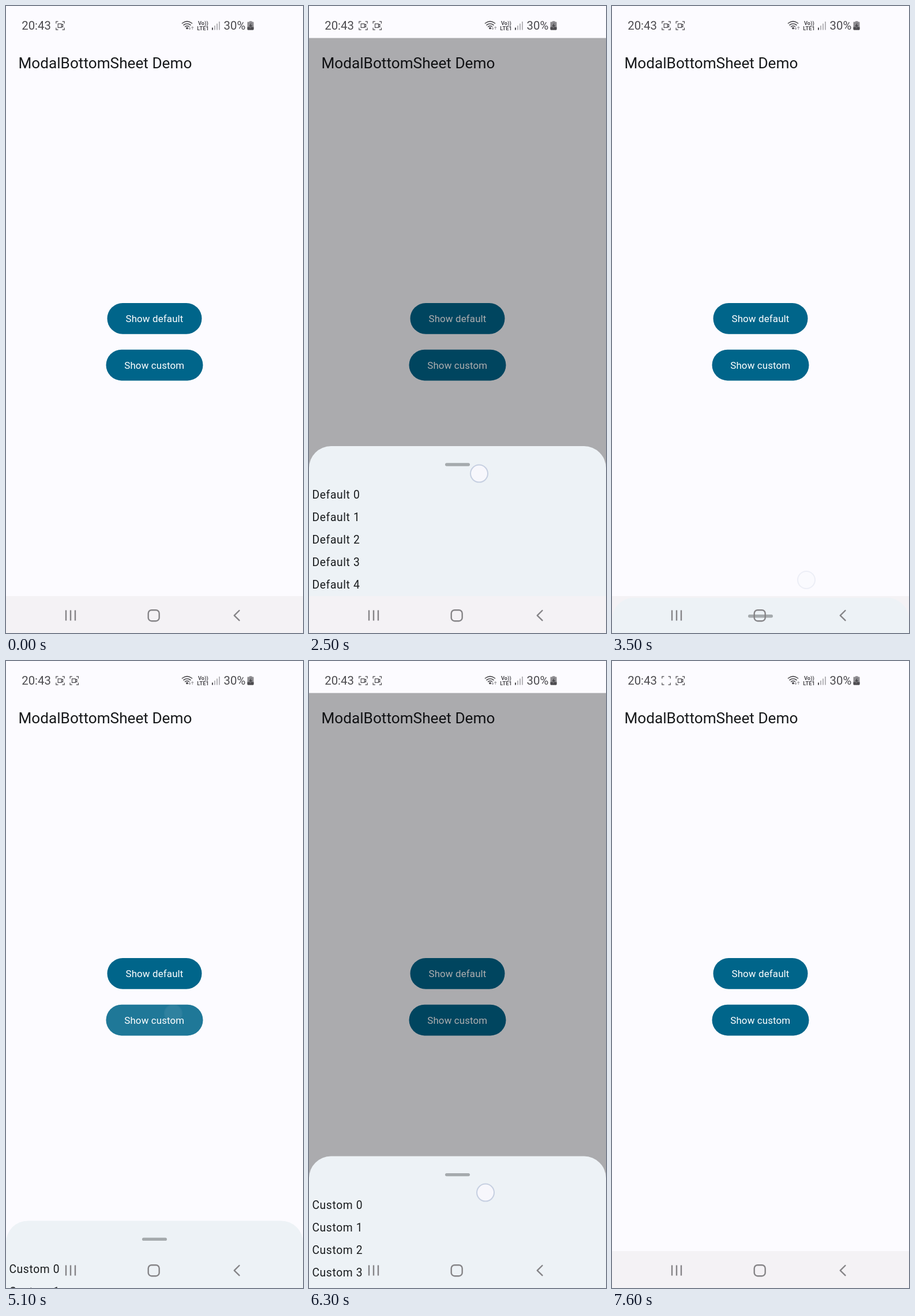
Recreate the animation shown at these times as an HTML page. Size 515 by 1087 pixels, loop 8000 ms.

```html
<!DOCTYPE html>
<html lang="en">
<head>
<meta charset="utf-8">
<title>Bottom sheet demo</title>
<style>
  html, body { margin: 0; width: 100%; height: 100%; overflow: hidden; background: #fcfbff; }
  svg { display: block; width: 100%; height: 100%; font-family: Roboto, "Open Sans", sans-serif; }
  .label { font-size: 16.9px; letter-spacing: .14px; fill: #fff; text-anchor: middle; }
  .item { font-size: 19.3px; letter-spacing: .64px; fill: #191c1e; }
  .line { fill: none; stroke-linecap: round; stroke-linejoin: round; }
</style>
</head>
<body>
<svg viewBox="0 0 515 1087">
  <defs>
    <path id="corners" d="M-7.2 -4v-3.2h3.2M4 -7.2h3.2v3.2M7.2 4v3.2h-3.2M-4 7.2h-3.2v-3.2"/>
    <path id="camera" d="M-3.8 -3.2h6v6.6h-6zM2.2 -.8l2.4 -1.6v5l-2.4 -1.6"/>
  </defs>
  <rect width="515" height="1087" fill="#fcfbff"/>
  <text x="21.4" y="107.5" font-size="26.2" fill="#17191b">ModalBottomSheet Demo</text>

  <rect x="175.5" y="515" width="164" height="53.7" rx="26.85" fill="#00658a"/>
  <rect id="rippleDefault" x="175.5" y="515" width="164" height="53.7" rx="26.85" fill="#fff"/>
  <text class="label" x="257.5" y="547.8">Show default</text>
  <rect x="173.5" y="595.7" width="168" height="53.7" rx="26.85" fill="#00658a"/>
  <rect id="rippleCustom" x="173.5" y="595.7" width="168" height="53.7" rx="26.85" fill="#fff"/>
  <text class="label" x="257.3" y="628.5">Show custom</text>

  <rect id="scrim" y="55.5" width="515" height="967.5" fill="#030004"/>
  <rect y="1023" width="515" height="64" fill="#f4f2f5"/>

  <g id="sheet">
    <path d="M0 260V38A38 38 0 0 1 38 0H477A38 38 0 0 1 515 38V260Z" fill="#edf2f6"/>
    <rect x="236" y="29.3" width="43" height="5.4" rx="2.7" fill="#a5aaad"/>
    <g id="items"></g>
  </g>
  <rect id="navCover" width="515" height="64" fill="#f4f2f5"/>

  <g class="line" stroke="#858487" stroke-width="2.4">
    <path d="M104 1047.5v18M112 1047.5v18M120 1047.5v18" stroke-linecap="butt"/>
    <rect x="246.7" y="1047.2" width="19" height="19" rx="5.8"/>
    <path d="M404.5 1048l-8.7 8.6 8.7 8.6"/>
  </g>

  <g fill="#4c4b4f">
    <text x="27.2" y="41" font-size="20.4">20:43</text>
    <text x="377.6" y="41" font-size="20.3">30%</text>
    <g font-size="9.3" font-weight="700">
      <text x="333" y="33">Vo))</text>
      <text x="331.3" y="42">LTE1</text>
    </g>
    <path d="M422 27.5v-1.3h4.5v1.3h2q1 0 1 1v11.5q0 1.5 -1.5 1.5h-8q-1.5 0 -1.5 -1.5v-11.5q0 -1 1 -1z" fill="#8d8c90"/>
    <path d="M418.5 36.5h11v3.5q0 1.5 -1.5 1.5h-8q-1.5 0 -1.5 -1.5zM425.5 29l-4.3 6.2h2.5l-.8 4.3 4.4 -6.2h-2.6z"/>
    <path d="M357 37.5h2v4h-2z"/>
    <path d="M361 34h2v7.5h-2zM365 30.5h2v11h-2zM369 27h2v14.5h-2z" fill="#b5b4b8"/>
    <circle cx="314" cy="38.4" r="1.9"/>
  </g>
  <g class="line" stroke="#4c4b4f" stroke-width="1.6">
    <path d="M305.5 30q8.5 -6.8 17 0M308 33q6 -4.6 12 0M310.6 35.8q3.4 -2.4 6.4 -.3"/>
    <path d="M318.5 36v4.5m-1.5 -1.5l1.5 1.5 1.5 -1.5M323.3 40.5v-4.5m-1.5 1.5l1.5 -1.5 1.5 1.5" stroke="#a3a2a6" stroke-width="1.1"/>
  </g>
  <g class="line" stroke="#4c4b4f" stroke-width="1.2">
    <g transform="translate(94 34)"><use href="#corners"/><use id="blink" href="#camera"/></g>
    <g id="recorder" transform="translate(118.3 34)"><use href="#corners"/><use href="#camera"/></g>
  </g>

  <circle id="touch" r="15" fill="#f8f8fd" stroke="#c4cee0" stroke-width="2"/>
</svg>
<script>
const LOOP = 8000, HIDDEN = 1087, SHEET_H = 260, ITEM_PITCH = 39.1, BLINK = 1014;
const $ = id => document.getElementById(id);
const ramp = (t, from, length) => Math.min(1, Math.max(0, (t - from) / length));
const mix = (a, b, p) => a + (b - a) * p;

// cubic-bezier(.4, 0, .2, 1)
function ease(x) {
  let lo = 0, hi = 1;
  for (let i = 0; i < 20; i++) {
    const u = (lo + hi) / 2, v = 1 - u;
    if (1.2 * u * v * v + .6 * u * u * v + u * u * u < x) lo = u; else hi = u;
  }
  return lo * lo * (3 - 2 * lo);
}
const tween = (t, from, length = 300) => ease(ramp(t, from, length));

// Each path point is [time, x, y]; the last one is the moment the finger lifts.
const sessions = [
  { name: 'Default', ripple: 'rippleDefault', rest: 763, press: 1100, open: 1463, dim: 1581, undim: 2850, tapY: 546,
    drag: [[2400, 295, 811], [2500, 295, 811], [2620, 298, 764], [2690, 300, 752], [2900, 312, 870],
           [3050, 324, 945], [3200, 334, 985], [3320, 337, 994], [3425, 337, 995]] },
  { name: 'Custom', ripple: 'rippleCustom', rest: 827, press: 4880, open: 5002, dim: 5118, undim: 6400, tapY: 611,
    drag: [[6000, 302, 890], [6150, 303, 892], [6300, 306, 921], [6430, 311, 1000]] }
];
for (const s of sessions) {
  s.tap = [[s.press, 290, s.tapY], [s.open, 290, s.tapY]];
  s.lift = s.drag[s.drag.length - 1][0];
}

function follow(path, t) {
  let i = 1;
  while (i < path.length - 1 && t > path[i][0]) i++;
  const [a, b] = [path[i - 1], path[i]];
  const p = ramp(t, a[0], b[0] - a[0]);
  return { x: mix(a[1], b[1], p), y: mix(a[2], b[2], p) };
}

// The sheet cannot rise above its rest, so it follows the finger from its highest point on.
function sheetTop(s, t) {
  if (t < s.drag[0][0]) return mix(HIDDEN, s.rest, tween(t, s.open));
  const { y } = follow(s.drag, t);
  const highest = Math.min(y, ...s.drag.filter(p => p[0] <= t).map(p => p[2]));
  return mix(s.rest + y - highest, HIDDEN, tween(t, s.lift));
}

const rows = Array.from({ length: 5 }, (_, i) => {
  const row = document.createElementNS('http://www.w3.org/2000/svg', 'text');
  row.setAttribute('class', 'item');
  row.setAttribute('x', 5.4);
  row.setAttribute('y', 91 + i * ITEM_PITCH);
  return $('items').appendChild(row);
});

function render(t) {
  const s = sessions[t < 4400 ? 0 : 1];
  const top = sheetTop(s, t);
  rows.forEach((row, i) => row.textContent = `${s.name} ${i}`);
  $('sheet').setAttribute('transform', `translate(0 ${top})`);
  $('sheet').setAttribute('visibility', top < HIDDEN ? 'visible' : 'hidden');
  $('navCover').setAttribute('y', top + SHEET_H);
  $('scrim').setAttribute('opacity', .32 * (tween(t, s.dim) - tween(t, s.undim)));

  for (const each of sessions) {
    const glow = ramp(t, each.press, 100) - ramp(t, each.open + 110, 120);
    $(each.ripple).setAttribute('opacity', .12 * glow);
  }

  const path = t < s.drag[0][0] ? s.tap : s.drag;
  const start = path[0][0], end = path[path.length - 1][0];
  const { x, y } = follow(path, t);
  $('touch').setAttribute('cx', x);
  $('touch').setAttribute('cy', y);
  $('touch').setAttribute('opacity', t < start ? 0 : .95 * (1 - ramp(t, end, 107)));

  const lit = t < 500 || (t - 500) % BLINK >= BLINK / 2;
  $('blink').setAttribute('visibility', lit ? 'visible' : 'hidden');
  $('recorder').setAttribute('visibility', t >= 200 ? 'visible' : 'hidden');
}

const began = performance.now();
function frame() {
  render((performance.now() - began) % LOOP);
  requestAnimationFrame(frame);
}
frame();
</script>
</body>
</html>
```
